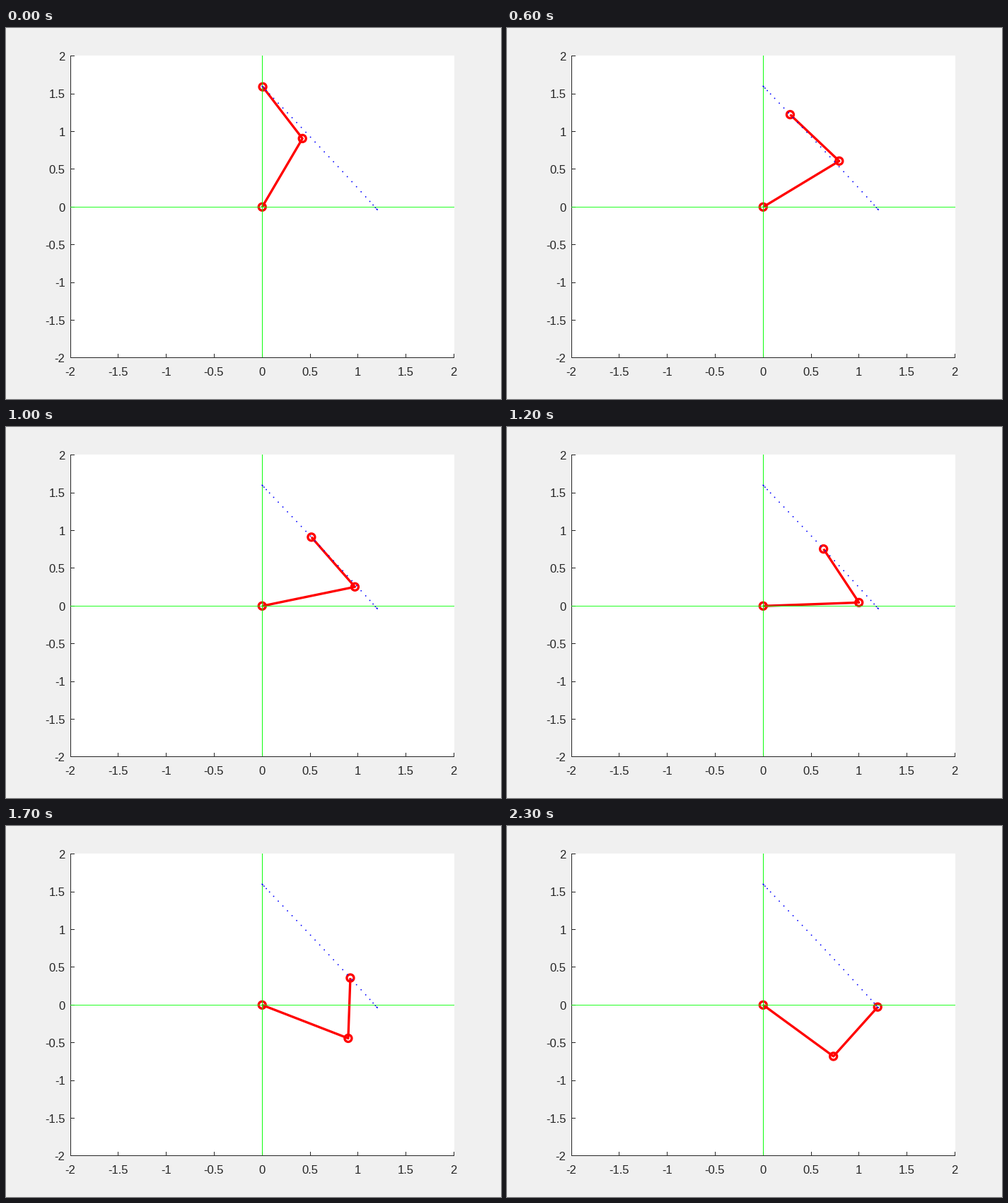
A matplotlib script that plays this animation: 700x525 px, repeating every 2.4 s.

```python
import numpy as np
import matplotlib.pyplot as plt
from matplotlib.animation import FuncAnimation
from matplotlib.patches import Circle, Rectangle

W, H, DPI = 700, 525, 100
PT = 72 / DPI                      # points per pixel
INK, RED, GREEN, BLUE = "#262626", "#ff0000", "#00ff00", "#0000ff"
L1, L2 = 1.0, 0.8                  # arm lengths
T, TB = 3.0, 0.5                   # move time, blend time
FRAMES, START, STEP = 24, 0.112, 0.1208
THICK = 3.33

plt.rcParams["font.family"] = "Liberation Sans"
fig = plt.figure(figsize=(W / DPI, H / DPI), dpi=DPI, facecolor="#f0f0f0")
ax = fig.add_axes([0, 0, 1, 1])
ax.set(xlim=(0, W), ylim=(H, 0))
ax.axis("off")


def px(x):
    return 362.25 + 135.6 * x


def py(y):
    return 253.3 - 106.8 * y


def blend(t):
    """Linear motion with parabolic blends, from 0 to 1."""
    v = 1 / (T - TB)
    a = v / TB
    return np.where(t < TB, a * t**2 / 2,
                    np.where(t > T - TB, 1 - a * (T - t)**2 / 2, v * (t - TB / 2)))


def tip(t):
    s = blend(np.asarray(t, float))
    return 1.2 * s, 1.6 - 1.6 * s - 0.035 * s**3


def elbow(x, y):
    r2 = x * x + y * y
    bend = np.arccos((r2 - L1**2 - L2**2) / (2 * L1 * L2))
    a = np.arctan2(y, x) - np.arctan2(L2 * np.sin(bend), L1 + L2 * np.cos(bend))
    return L1 * np.cos(a), L1 * np.sin(a)


def hline(y, x0, x1, color, **kw):
    """One-pixel line filling the pixel row that holds y."""
    ax.add_patch(Rectangle((x0, np.floor(y)), x1 - x0, 1, fc=color, ec="none", **kw))


def vline(x, y0, y1, color, **kw):
    ax.add_patch(Rectangle((np.floor(x), y0), 1, y1 - y0, fc=color, ec="none", **kw))


# Plot box, ticks and labels
left, right, top, base = 91, 634, 39, 467
ax.add_patch(Rectangle((left, top), right - left, base - top, fc="white", ec="none", zorder=0))
vline(left, top, base, INK)
hline(base - 1, left, right, INK)
font = dict(color=INK, fontsize=16.67 * PT, va="baseline", parse_math=False)
for v in np.arange(-2, 2.1, 0.5):
    x, y = px(v), py(v)
    vline(x, base - 6, base, INK)
    hline(y, left, left + 6, INK)
    ax.text(x - 0.5, 492, f"{v:g}", ha="center", **font)
    ax.text(83.5, y + 6.3, f"{v:g}", ha="right", **font)

# Arm
arm, = ax.plot([], [], color=RED, lw=THICK * PT, zorder=2,
               solid_capstyle="butt", solid_joinstyle="round")
joints = [ax.add_patch(Circle((px(0), py(0)), 5, fill=False, ec=RED, lw=THICK * PT, zorder=2))
          for _ in range(3)]

# Zero lines and planned path
hline(py(0), left, right, GREEN, zorder=3, alpha=0.85)
vline(px(0), top, base - 1, GREEN, zorder=3, alpha=0.95)
for x, y in zip(*tip(np.linspace(0, T, 31))):
    ax.add_patch(Circle((px(x), py(y)), 0.9, fc=BLUE, ec="none", zorder=4))


def draw(i):
    x, y = tip(START + STEP * i)
    ex, ey = elbow(x, y)
    xs, ys = px(np.array([0, ex, x])), py(np.array([0, ey, y]))
    arm.set_data(xs, ys)
    for joint, cx, cy in zip(joints, xs, ys):
        joint.center = cx, cy
    return [arm, *joints]


anim = FuncAnimation(fig, draw, frames=FRAMES, interval=100, repeat=True, repeat_delay=0)
plt.show()
```
